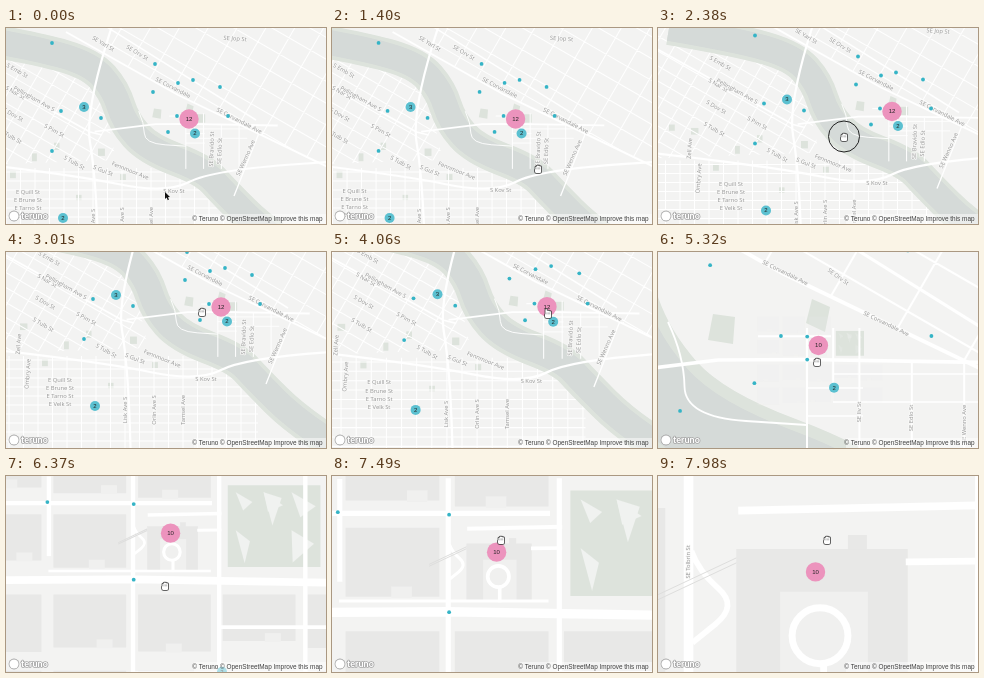
Animation of 320x196 px, one loop 8 s. Source, as an HTML page with a canvas:

```html
<!DOCTYPE html>
<html lang="en">
<head>
<meta charset="utf-8">
<title>Clustered map</title>
<style>
html, body { margin: 0; width: 100%; height: 100%; overflow: hidden; background: #f3f3f2; }
canvas { display: block; width: 320px; height: 196px; }
</style>
</head>
<body>
<canvas id="stage"></canvas>
<script>
const W = 320, H = 196, LOOP = 8000, STEP = 70;
const LAND = '#f3f3f2', WATER = '#d5dad8', PARK = '#dde3dc', HOUSE = '#e8e8e7';
const cv = document.getElementById('stage');
const ctx = cv.getContext('2d');
const dpr = window.devicePixelRatio || 1;
cv.width = W * dpr;
cv.height = H * dpr;

let seed = 11;
const rnd = (a = 0, b = 1) => a + (b - a) * (seed = seed * 16807 % 2147483647) / 2147483647;
const times = (n, f) => Array.from({ length: n }, (_, i) => f(i));

// A view maps map units to the stage: X = s * x + view.x
const zoomAt = (v, ax, ay, k) => ({ s: v.s * k, x: ax + (v.x - ax) * k, y: ay + (v.y - ay) * k });
const pan = (v, dx, dy) => ({ s: v.s, x: v.x + dx, y: v.y + dy });
const HOME = { s: 1, x: 0, y: 0 };
const CITY = pan(HOME, 32, -36);
const AREA = { s: 2.95, x: -381.5, y: -175.6 };
const BLOCK = zoomAt(AREA, 158.6, 109.3, 3.3);
const YARD = zoomAt(pan(BLOCK, 1, 16.5), 169, 64, 3.38);

// Motion
const clamp = p => Math.max(0, Math.min(1, p));
const span = (t, a, b) => clamp((t - a) / (b - a));
const soft = p => p * p * (3 - 2 * p);
const inOut = p => p < .5 ? 4 * p ** 3 : 1 - 4 * (1 - p) ** 3;

function track(keys, t) {
  let i = 0;
  while (i < keys.length - 2 && t >= keys[i + 1][0]) i++;
  const [a, b] = [keys[i], keys[i + 1]];
  const p = soft(span(t, a[0], b[0]));
  return [a[1] + (b[1] - a[1]) * p, a[2] + (b[2] - a[2]) * p];
}

const drag = [[1350, 0, 0], [2170, 53, -3], [2380, 51, -7.5], [3010, 32, -36]];
const mouse = [
  [0, 159, 164], [140, 79, 87], [210, 157, 130], [700, 157, 130], [1120, 211, 140],
  [1330, 211, 140], [1400, 206, 141], [2170, 257, 134], [2380, 186, 109], [3010, 196, 60],
  [3780, 216, 62], [4720, 216, 62], [5320, 159, 110], [6540, 159, 110], [7070, 169, 64]
];

function viewAt(t) {
  if (t < 3890) return pan(HOME, ...track(drag, t));
  if (t < 4720) return zoomAt(CITY, 216, 62, 2.95 ** inOut(span(t, 3890, 4690)));
  if (t < 5670) {
    const p = 1 - soft(span(t, 4720, 5320));
    return pan(AREA, 54.7 * p, -51.5 * p);
  }
  if (t < 6540) return zoomAt(AREA, 158.6, 109.3, 3.3 ** inOut(span(t, 5670, 6440)));
  const p = soft(span(t, 6540, 6800));
  return zoomAt(pan(BLOCK, p, 16.5 * p), 169, 64, 3.38 ** soft(span(t, 7280, 8000)));
}

// Shapes: flat x, y pairs given in a view, kept in map units
const toMap = (v, x, y) => [(x - v.x) / v.s, (y - v.y) / v.s];

function line(v, ...pts) {
  const p = new Path2D();
  for (let i = 0; i < pts.length; i += 2) p.lineTo(...toMap(v, pts[i], pts[i + 1]));
  return p;
}
function curve(v, ...pts) {
  const q = times(pts.length / 2, i => toMap(v, pts[2 * i], pts[2 * i + 1]));
  const p = new Path2D();
  p.moveTo(...q[0]);
  for (let i = 1; i < q.length - 1; i++) {
    const [a, b] = [q[i], q[i + 1]];
    p.quadraticCurveTo(...a, (a[0] + b[0]) / 2, (a[1] + b[1]) / 2);
  }
  p.lineTo(...q.at(-1));
  return p;
}
const box = (v, x, y, w, h) => line(v, x, y, x + w, y, x + w, y + h, x, y + h);

const river = curve(HOME, -40, 8, 30, 20, 85, 36, 108, 62, 118, 94, 142, 121, 198, 142, 218, 164, 258, 204, 330, 250);

function grid(area, deg, du, dv) {
  const lines = new Path2D();
  for (let i = -30; i <= 30; i++) {
    lines.moveTo(i * du, -600);
    lines.lineTo(i * du, 600);
    lines.moveTo(-600, i * dv);
    lines.lineTo(600, i * dv);
  }
  return { area, deg, lines };
}
const grids = [
  grid(line(HOME, -60, -20, 90, 40, 110, 132, -60, 138), 30, 17, 13),
  grid(box(HOME, -60, 140, 280, 140), 0, 14.5, 9),
  grid(line(HOME, 60, -60, 400, -60, 400, 178, 172, 67, 112, 32), 30, 25, 19)
];

const road = (w, path) => ({ w, path });
const roads = [
  road(1.9, line(HOME, 60, 4, 172, 67, 380, 167)),
  road(1.5, line(HOME, 80, -14, 250, 92)),
  road(1.7, line(HOME, -60, 24, 84, 104, 96, 107)),
  road(1.8, line(AREA, -120, 130, 60, 108, 149, 107.5, 420, 112)),
  road(2.2, curve(HOME, 112, -20, 78, 79, 90, 150, 94, 280)),
  road(2.2, curve(HOME, -60, 132, 64, 146, 160, 166, 206, 142, 380, 130)),
  road(1.3, line(HOME, 228, 168, 253, 105)),
  road(.9, curve(AREA, 10, 70, 26, 104, 27, 165, 149, 173)),
  ...[0, 1, 2, 4, 6].map(i => road(1, line(AREA, 149 + 26.2 * i, i > 2 ? 111 : 76, 149 + 26.2 * i, i === 1 ? 136 : 240))),
  road(1, line(AREA, 100, 84.3, 173, 84.3)),
  ...times(4, i => road(.85, line(AREA, i % 2 ? 149 : 175, 122 + 14 * i, i % 2 ? 205 : 330, 122 + 14 * i)))
];
const lanes = [
  road(1, line(BLOCK, 42.5, 0, 42.5, 80)),
  road(.8, line(YARD, 80, 34.5, 330, 29)),
  road(.7, line(YARD, 248, 86, 330, 85)),
  road(.6, curve(YARD, 33, 75, 40, 95, 80, 130, 34, 167)),
  road(.7, line(BLOCK, 167, 84, 167, 96)),
  road(.6, line(BLOCK, 42, 95, 205, 95))
];
const walks = [0, 5].map(d => line(YARD, -20, 128 + d, 78, 82 + d));
const circle = new Path2D();
circle.arc(...toMap(YARD, 162, 160), 28 / YARD.s, 0, 7);

// Parks: a few fixed greens and small squares scattered over downtown
const green = box(BLOCK, 222, 9, 93, 82);
const parks = [
  green,
  line(AREA, 55, 62, 77, 65, 75, 92, 50, 88),
  line(AREA, 154, 47, 172, 55, 167, 80, 148, 71),
  ...times(9, i => box(HOME, -40 + 22 * i, rnd(104, 180), rnd(4, 8), rnd(5, 9)))
];
const shards = times(6, i => {
  const x = 230 + 28 * (i % 3), y = 16 + 38 * (i >> 1 & 1);
  return line(BLOCK, x, y, x + rnd(14, 28), y + rnd(4, 14), x + rnd(-4, 12), y + rnd(18, 34));
});

// One house with a notch per campus block
const houses = [box(YARD, 78, 73, 172, 150), box(YARD, 190, 59, 19, 15)];
const gaps = [box(YARD, 122, 116, 88, 106)];
for (let i = -1; i < 4; i++) {
  for (let j = -1; j < 3; j++) {
    const taken = j === 0 && i > 0 || j === -1 && i > 1;
    if (taken) continue;
    const x = 47 + 85 * i, y = (j > 0 ? 42 : 38) + 76.5 * j;
    const h = rnd(46, 60);
    houses.push(box(BLOCK, x, y, 73, h));
    gaps.push(box(BLOCK, x + rnd(5, 50), y + h - 8, 16, 9));
  }
}

// Labels come in rows: a first place and a step
const row = (names, v, x, y, dx, dy, deg, min = 0, max = 1.9) => names.split(', ').map((name, i) =>
  ({ name, at: toMap(v, x + dx * i, y + dy * i), deg, min, max }));
const labels = [
  row('SE Yarl St, SE Orv St', HOME, 97, 16, 34, 9, 31),
  row('SE Jop St', HOME, 229, 11, 0, 0, 4),
  row('SE Corvandale, SE Corvandale Ave', HOME, 167, 60, 66, 33, 27),
  row('SE Bravido St, SE Edlo St', HOME, 206, 121, 8, 2, -88),
  row('SE Wenno Ave', HOME, 240, 130, 0, 0, -66),
  row('S Emb St, S Nar St, S Dov St, S Tulb St', HOME, 11, 43, -2, 22, 30),
  row('Pellingham Ave S, S Pim St, S Tulb St', HOME, 28, 71, 20, 32, 29),
  row('S Gul St, Fennmoor Ave', HOME, 97, 143, 27, 0, 22),
  row('S Kov St', HOME, 168, 163, 0, 0, 0),
  row('E Quill St, E Brune St, E Tarno St, E Velk St', HOME, 22, 164, 0, 8, 0),
  row('Zell Ave, Ombry Ave', HOME, -19, 128, 9, 30, -86),
  row('Lisk Ave S, Orlin Ave S, Tamsel Ave', HOME, 87, 194, 29, 0, -90),
  row('SE Corvandale Ave, SE Corvandale Ave', AREA, 127, 21, 101, 51, 26, 1.9, 6),
  row('SE Orv St', AREA, 180, 25, 0, 0, 36, 1.9, 6),
  row('SE Ilv St, SE Edlo St, SE Wenno Ave', AREA, 201, 160, 52.5, 6, -90, 1.9, 6),
  row('SE Tolbrin St', YARD, 30, 86, 0, 0, -90, 14, 99)
].flat();

const dots = [
  [46, 15], [187, 52], [172, 55], [214, 59], [149, 36], [147, 64],
  [171, 88], [162, 104], [55, 83], [95, 90], [46, 123], [222, 88]
];
const freed = [[179.9, 88.2], [179.9, 96], [136.8, 113.4]];

// Drawing
function text(s, x, y, font, fill, align = 'center', halo) {
  ctx.font = font;
  ctx.textAlign = align;
  ctx.textBaseline = 'middle';
  ctx.lineJoin = 'round';
  ctx.lineWidth = 1.6;
  if (halo) {
    ctx.strokeStyle = halo;
    ctx.strokeText(s, x, y);
  }
  ctx.fillStyle = fill;
  ctx.fillText(s, x, y);
}
function disc(x, y, r, fill) {
  ctx.beginPath();
  ctx.arc(x, y, r, 0, 7);
  ctx.fillStyle = fill;
  ctx.fill();
}
function fillAll(paths, fill) {
  ctx.fillStyle = fill;
  paths.forEach(p => ctx.fill(p));
}
function stroke(path, width, color) {
  ctx.lineWidth = width;
  ctx.strokeStyle = color;
  ctx.stroke(path);
}

function drawMap(v) {
  const k = v.s ** .65 / v.s;
  const pave = r => stroke(r.path, r.w * k, '#fff');
  ctx.save();
  ctx.translate(v.x, v.y);
  ctx.scale(v.s, v.s);
  ctx.lineJoin = 'round';
  fillAll(parks, PARK);
  for (const g of grids) {
    ctx.save();
    ctx.clip(g.area);
    ctx.rotate(g.deg * Math.PI / 180);
    stroke(g.lines, k, '#fff');
    ctx.restore();
  }
  stroke(river, 33, PARK);
  stroke(river, 25, WATER);

  ctx.globalAlpha = span(v.s, 1.8, 8);
  ctx.save();
  ctx.clip(green);
  fillAll(shards, '#f0f2f0');
  ctx.restore();
  fillAll(houses, HOUSE);
  fillAll(gaps, '#f0f0ef');
  ctx.globalAlpha = 1;
  roads.forEach(pave);
  ctx.globalAlpha = span(v.s, 3, 8);
  lanes.forEach(pave);
  stroke(circle, .72 * k, '#fff');
  walks.forEach(p => stroke(p, 1 / v.s, '#dededd'));
  ctx.restore();
}

function drawLabels(v) {
  for (const l of labels) {
    if (v.s < l.min || v.s >= l.max) continue;
    ctx.save();
    ctx.translate(l.at[0] * v.s + v.x, l.at[1] * v.s + v.y);
    ctx.rotate(l.deg * Math.PI / 180);
    text(l.name, 0, 0, '5.8px "Open Sans", sans-serif', '#959595', 'center', '#f8f8f7');
    ctx.restore();
  }
}

function drawPoints(v) {
  const open = v.s > 2;
  const put = (x, y) => [x * v.s + v.x, y * v.s + v.y];
  const cluster = (x, y, n) => {
    const [cx, cy] = put(x, y);
    disc(cx, cy, n < 10 ? 5 : 9.7, n < 10 ? '#5bc0d0' : '#ec93bd');
    text(n, cx, cy + .3, '6px "Liberation Sans", Arial, sans-serif', '#222');
  };
  for (const d of open ? [...dots, ...freed] : dots) disc(...put(...d), 1.9, '#35b4c6');
  cluster(78, 79, 3);
  cluster(57, 190, 2);
  cluster(189, 105.5, 2);
  if (open) cluster(183.7, 91.2, 10);
  else cluster(183, 91, 12);
}

function drawArrow() {
  const arrow = line(HOME, 0, 0, 0, 7, 1.6, 5.6, 2.8, 8.2, 4, 7.6, 2.9, 5.2, 5, 5);
  arrow.closePath();
  stroke(arrow, .8, '#fff');
  fillAll([arrow], '#111');
}

// A palm with four fingers; the first one stretches when pointing
function drawHand(pointing) {
  const hand = new Path2D();
  hand.roundRect(-3, -.8, 6.2, 4.8, 1.6);
  for (let i = 0; i < 4; i++) {
    const top = pointing && i === 0 ? -5 : -2.6 - Math.sin(i);
    hand.roundRect(-2.6 + 1.4 * i, top, 1.5, 2 - top, .7);
  }
  stroke(hand, 1.5, '#333');
  fillAll([hand], '#fff');
  for (let i = 0; i < 3; i++) stroke(line(HOME, -1.1 + 1.4 * i, -1.6, -1.1 + 1.4 * i, .4), .4, '#555');
}

function drawCursor(t) {
  const [x, y] = track(mouse, t);
  ctx.save();
  ctx.translate(x, y);
  if ((t >= 350 && t < 1260) || (t >= 2310 && t < 2520)) {
    const ring = new Path2D();
    ring.arc(0, -.5, 15.5, 0, 7);
    stroke(ring, 1, '#222');
  }
  if (t < 210) drawArrow();
  else drawHand(t >= 3500 && t < 4720);
  ctx.restore();
}

function drawCredits() {
  ctx.fillStyle = 'rgba(255,255,255,.5)';
  ctx.fillRect(188, 186, 132, 10);
  text('© Teruno © OpenStreetMap Improve this map', 316.5, 191.5,
    '6.4px "Liberation Sans", Arial, sans-serif', '#404040', 'right');
  disc(8, 188, 5.4, '#a5a5a5');
  disc(8, 188, 4.6, '#fff');
  text('teruno', 15, 188, 'bold 9px Lato, sans-serif', '#fff', 'left', '#a5a5a5');
}

function frame(now) {
  const t = Math.floor((now % LOOP) / STEP) * STEP;
  const v = viewAt(t);
  ctx.setTransform(dpr, 0, 0, dpr, 0, 0);
  ctx.fillStyle = LAND;
  ctx.fillRect(0, 0, W, H);
  drawMap(v);
  drawLabels(v);
  drawPoints(v);
  drawCredits();
  drawCursor(t);
}

const start = performance.now();
function loop() {
  frame(performance.now() - start);
  requestAnimationFrame(loop);
}
loop();
</script>
</body>
</html>
```
